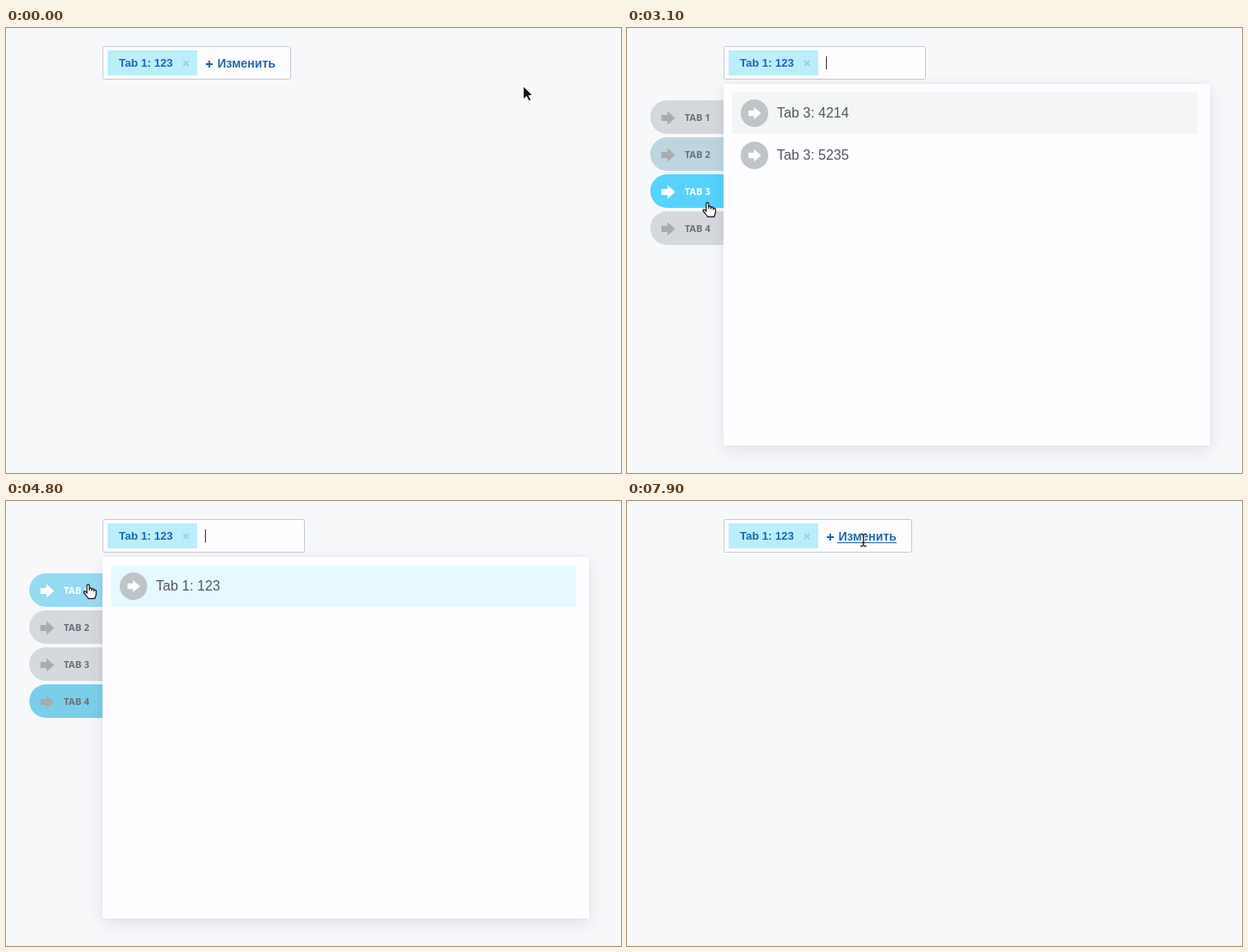
These frames come from a looping animation (714x517 px, 8000 ms). An HTML page:

```html
<!DOCTYPE html>
<html lang="ru">
<head>
<meta charset="utf-8">
<title>Tab selector</title>
<style>
  html, body { margin: 0; width: 100%; height: 100%; overflow: hidden; background: #f7f8fa; }
  svg { display: block; }
  text { font-family: "Liberation Sans", Arial, sans-serif; }
  .tag { font-weight: 700; font-size: 13px; fill: #1c67b3; }
  .link { font-weight: 700; font-size: 14px; fill: #2166a5; }
  .row { font-size: 16px; fill: #525660; }
  .label { font: 700 11px "Open Sans", sans-serif; }
  .empty { font: 300 20px "Open Sans", sans-serif; fill: #7d838a; text-anchor: middle; }
  #panel { filter: drop-shadow(0 7px 10px rgba(83, 92, 105, .12)) drop-shadow(0 -1px 3px rgba(83, 92, 105, .06)); }
</style>
</head>
<body>
<svg width="714" height="517" viewBox="0 0 714 517">
  <defs>
    <path id="arrow" d="M-8-3.5H-1V-8L8 0-1 8V3.5H-8Z"/>
  </defs>

  <rect id="field" x="112.5" y="21.5" width="218" height="38" rx="2" fill="#fefdff" stroke="#c5c9cf"/>
  <rect x="118" y="26" width="104" height="29" fill="#bbedfb"/>
  <text class="tag" x="131" y="45">Tab 1: 123</text>
  <path d="M206 38l6 6m0-6l-6 6" stroke="#a0cfdb" stroke-width="1.8"/>
  <g id="link">
    <path d="M232 42h8m-4-4v8" stroke="#2166a5" stroke-width="2"/>
    <text class="link" x="245.5" y="46">Изменить</text>
    <path id="underline" d="M244 48.5h69" stroke="#2166a5"/>
  </g>
  <rect id="caret" x="231" y="33" width="1" height="15" fill="#333"/>

  <g id="popup">
    <g id="tabs"></g>
    <rect id="panel" x="112" y="65" width="565" height="420" fill="#fefdff"/>
    <rect id="focus" x="122" y="75" width="540" height="48"/>
    <g id="rows"></g>
    <g id="none">
      <g fill="none" stroke="#ebebed">
        <circle cx="384" cy="201" r="25" stroke-width="8"/>
        <path d="M404 221l16 16" stroke-width="10" stroke-linecap="round"/>
      </g>
      <text class="empty" x="389.5" y="300">В категории «Tab 4» ничего не найдено</text>
    </g>
  </g>

  <g id="pointer" fill="#111" stroke="#fff" stroke-linejoin="round">
    <path d="M.5.5V16l3.8-3.6L7 18l2.6-1.2L7 11.5h4.6Z"/>
  </g>
  <g id="beam" fill="none">
    <path d="M-4-7.5h2.5L0-6 1.5-7.5H4M-4 7.5h2.5L0 6 1.5 7.5H4M0-6V6M-2 3H2" stroke="#fff" stroke-width="2.4"/>
    <path d="M-3.5-7h2L0-5.8 1.5-7h2M-3.5 7h2L0 5.8 1.5 7h2M0-6V6M-2 3H2" stroke="#222" stroke-width="1.3"/>
  </g>
  <g id="hand" fill="#fff" stroke="#111" stroke-width="1.2" stroke-linejoin="round">
    <path d="M5 11V2.2a1.4 1.4 0 0 1 2.8 0V7.5V6.4a1.3 1.3 0 0 1 2.7 0V8V7.2a1.3 1.3 0 0 1 2.6 0V8.8a1.2 1.2 0 0 1 2.6-.4V12c0 2-1.2 3-1.6 5.4H6.6C6 15 3 13 1.5 10.7c-.8-1.4.9-2.5 2-1.4Z"/>
  </g>
</svg>
<script>
const LOOP = 8000, STEP = 100;
const $ = id => document.getElementById(id);

// Step tables: [time, ...values]; each row holds until the next.
const cursor = [
  [0, 'pointer', 600, 67], [300, 'pointer', 440, 74], [400, 'pointer', 307, 78],
  [600, 'pointer', 288, 68], [700, 'pointer', 267, 55],
  [900, 'beam', 266, 52], [1000, 'beam', 265, 49], [1100, 'beam', 265, 47], [1300, 'beam', 265, 43],
  [1800, 'pointer', 245, 70], [1900, 'pointer', 200, 115], [2000, 'pointer', 150, 155],
  [2100, 'hand', 96, 185], [2200, 'hand', 83, 199], [2800, 'hand', 87, 202],
  [3300, 'hand', 88, 215], [3400, 'hand', 88, 228], [3500, 'hand', 88, 235],
  [4100, 'hand', 88, 200], [4200, 'hand', 88, 150], [4300, 'hand', 89, 115], [4400, 'hand', 89, 96],
  [5000, 'hand', 89, 130], [5100, 'hand', 86, 170], [5300, 'hand', 83, 197],
  [6000, 'hand', 95, 180], [6100, 'pointer', 150, 150], [6200, 'pointer', 210, 90],
  [6300, 'beam', 250, 34], [6400, 'beam', 256, 41], [6600, 'beam', 270, 32], [6800, 'beam', 268, 36],
  [7100, 'beam', 266, 37], [7400, 'beam', 280, 47], [7500, 'beam', 290, 55], [7900, 'beam', 274, 45]
];
const clicks = [[0, 1], [2900, 2], [3800, 3], [4700, 0], [5600, 2]];
const fade = [[0, 0, 8], [1300, .4, 6], [1400, .92, 2], [1500, 1, 0],
  [6800, .8, 1], [6900, .5, 3], [7000, .15, 4], [7100, 0, 4]];
const spread = [[0, 0], [2400, .55], [2500, .97], [2700, 1], [6200, .5], [6300, .05], [6400, 0]];
const blink = [[0, 0], [1300, 1], [1800, 0], [2400, 1], [2800, 0], [2900, 1], [3400, 0],
  [3800, 1], [4300, 0], [4800, 1], [5300, 0], [5600, 1], [6100, 0]];
const focusFill = [[0, 'none'], [2900, '#f3f6f5'], [3800, 'none'], [4700, '#e6f9fe'],
  [5600, '#f9fefe'], [5700, '#f3f6f5'], [6200, 'none']];
const editing = [[0, 0], [1300, 1], [6900, 0]];
const hoverLink = [[0, 0], [900, 1]];
const lists = [['Tab 1: 123'], ['Tab 2: 1234'], ['Tab 3: 4214', 'Tab 3: 5235'], []];

const GREY = [213, 216, 220], GREY_HOVER = [223, 227, 230];
const BLUE = [45, 197, 245], BLUE_HOVER = [65, 208, 255];

const indexAt = (table, t) => table.findLastIndex(row => row[0] <= t);
const at = (table, t) => table[indexAt(table, t)].slice(1);
const mix = (a, b, k) => `rgb(${a.map((v, i) => Math.round(v + (b[i] - v) * k))})`;
const show = (el, on) => el.style.display = on ? '' : 'none';
const move = (el, x, y) => el.setAttribute('transform', `translate(${x} ${y})`);

$('tabs').innerHTML = lists.map((_, i) => `
  <g transform="translate(27 ${84 + 43 * i})">
    <path d="M90 0H19.5a19.5 19.5 0 0 0 0 39H90Z"/>
    <g><use href="#arrow" x="21" y="20.5"/><text class="label" x="40" y="24">TAB ${i + 1}</text></g>
  </g>`).join('');
const tabs = [...$('tabs').children];

$('rows').innerHTML = lists.map(list => '<g>' + list.map((name, i) => `
  <g transform="translate(0 ${49 * i})">
    <circle cx="148" cy="99" r="16" fill="#bfc4c8"/>
    <use href="#arrow" transform="translate(148.3 99) scale(.92)" fill="#fff"/>
    <text class="row" x="174" y="104">${name}</text>
  </g>`).join('') + '</g>').join('');
const groups = [...$('rows').children];

function drawTabs(t, hovered) {
  const n = indexAt(clicks, t), [start, active] = clicks[n];
  const last = n ? clicks[n - 1][1] : -1;
  const k = n ? Math.min(1, (t - start + 16) / 250) : 1;
  tabs.forEach((tab, i) => {
    const amount = i === active ? k : i === last ? 1 - k : 0;
    const over = i === hovered;
    const [bg, ink] = tab.children;
    bg.setAttribute('fill', mix(over ? GREY_HOVER : GREY, over ? BLUE_HOVER : BLUE, amount));
    const [icon, label] = ink.children;
    icon.setAttribute('fill', i === active ? '#fff' : '#a7acb1');
    label.setAttribute('fill', i === active ? '#fff' : '#6b7078');
    show(groups[i], i === active);
  });
  show($('none'), !lists[active].length);
}

function draw(time) {
  const t = Math.floor(time / STEP) * STEP;
  const [kind, x, y] = at(cursor, t);
  for (const id of ['pointer', 'beam', 'hand']) show($(id), id === kind);
  const half = kind === 'beam' ? .5 : 0;
  move($(kind), x + half, y + half);

  const [edit] = at(editing, t);
  $('field').setAttribute('width', edit ? 234 : 218);
  show($('link'), !edit);
  show($('underline'), at(hoverLink, t)[0]);
  show($('caret'), edit && at(blink, t)[0]);

  const [opacity, drop] = at(fade, t);
  show($('popup'), opacity);
  $('popup').setAttribute('opacity', opacity);
  move($('popup'), 0, drop);
  move($('tabs'), 48 * (1 - at(spread, t)[0]), 0);
  $('focus').setAttribute('fill', at(focusFill, t)[0]);
  drawTabs(t, kind === 'hand' ? Math.floor((y - 82) / 43) : -1);
}

const origin = performance.now();
function tick() {
  draw((performance.now() - origin) % LOOP);
  requestAnimationFrame(tick);
}
tick();
</script>
</body>
</html>
```
